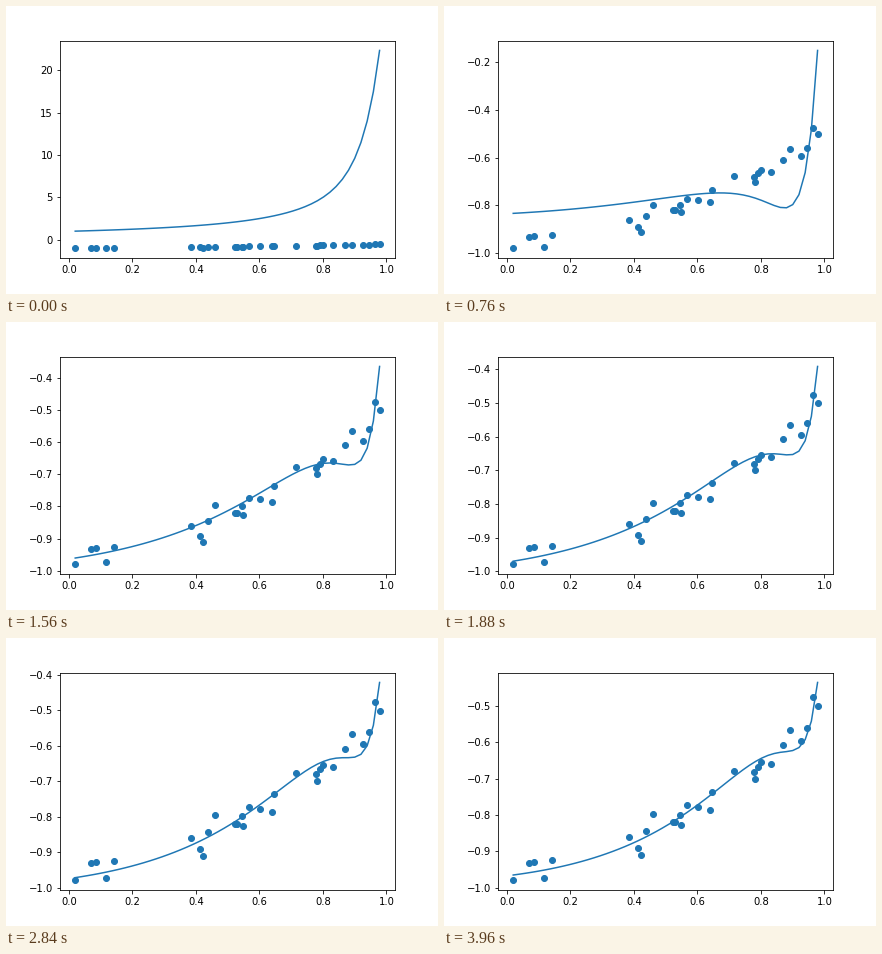
Recreate the animation shown at these times as a matplotlib script. Size 432 by 288 pixels, loop 4000 ms.

```python
import numpy as np
import matplotlib.pyplot as plt
from matplotlib.animation import FuncAnimation

FRAMES = 100
TERMS = 30
POINTS = 30
RATE = 0.1
STEPS = 10  # descent steps between two frames

rng = np.random.RandomState(0)
x = rng.rand(POINTS)
y = -np.cos(x) + 0.1 * rng.rand(POINTS)
grid = np.linspace(x.min(), x.max(), 50)


def powers(t):
    return np.vander(t, TERMS, increasing=True)


def fit_curves():
    """Polynomial on the grid for each frame of the gradient descent."""
    a, g = powers(x), powers(grid)
    w = np.ones(TERMS)
    curves = []
    for _ in range(FRAMES):
        curves.append(g @ w)
        for _ in range(STEPS):
            w = w - RATE * a.T @ (a @ w - y) / POINTS
    return curves


curves = fit_curves()

fig, ax = plt.subplots(figsize=(6, 4), dpi=72)
fig.subplots_adjust(left=0.125, right=0.9, bottom=0.125, top=0.88)


def draw(i):
    ax.clear()
    ax.scatter(x, y)
    ax.plot(grid, curves[i])


anim = FuncAnimation(fig, draw, frames=FRAMES, init_func=lambda: None,
                     interval=40, repeat=True, repeat_delay=0)
plt.show()
```
